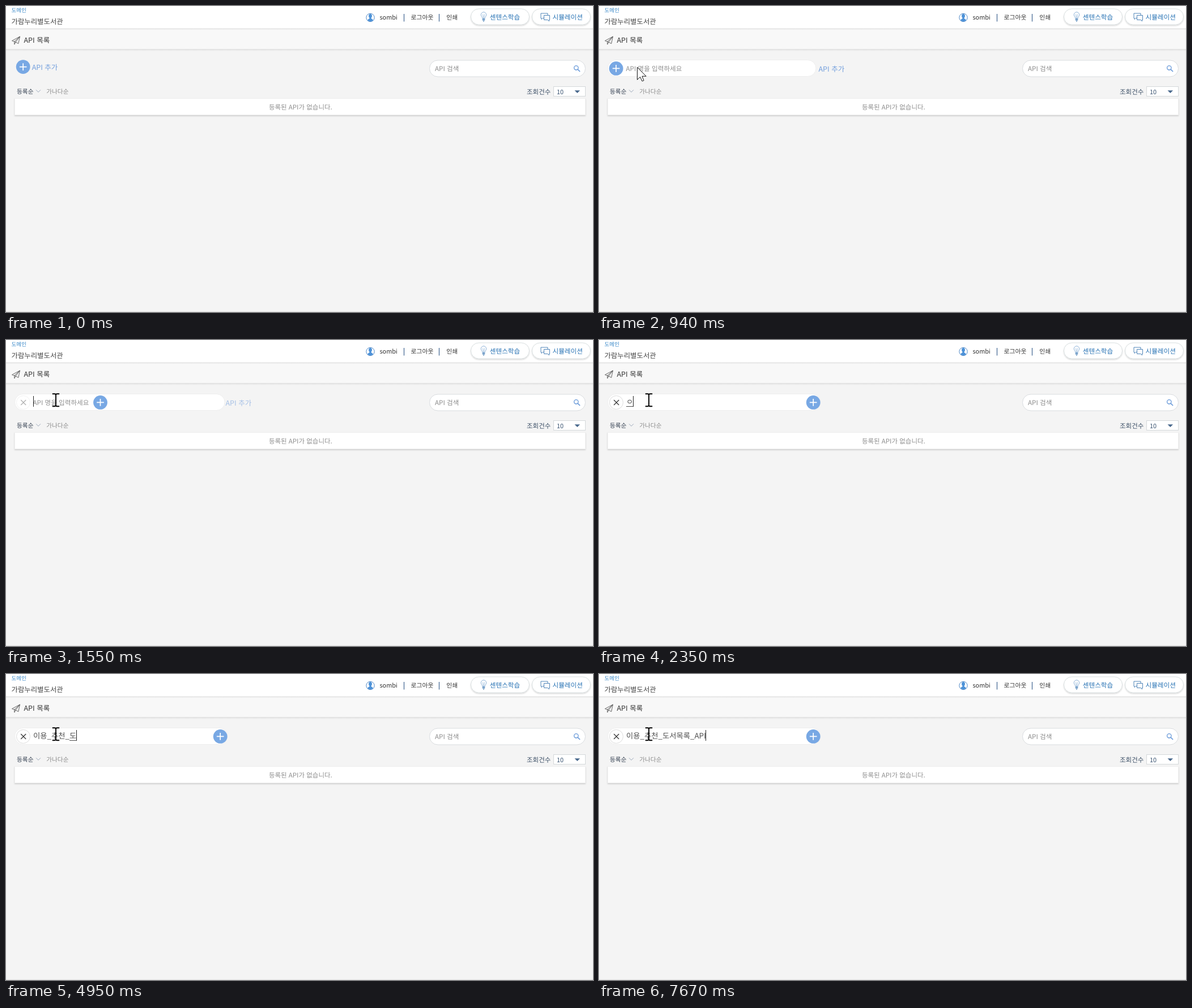
These frames come from a looping animation (1036 px wide and 541 px high, 8 s). An HTML page:

```html
<!DOCTYPE html>
<html lang="ko">
<head>
<meta charset="utf-8">
<title>API 목록</title>
<style>
html, body { margin: 0; width: 100%; height: 100%; overflow: hidden; background: #f4f4f4; }
svg { display: block; width: 1036px; height: 541px; }
text {
  font-family: "Noto Sans CJK KR", "Noto Sans KR", "Noto Sans CJK", sans-serif;
  text-rendering: geometricPrecision;
  white-space: pre;
}
</style>
</head>
<body>
<svg viewBox="0 0 1036 541" xmlns="http://www.w3.org/2000/svg">
  <defs>
    <filter id="shade" x="-10%" y="-30%" width="120%" height="180%">
      <feDropShadow dx="0" dy="1.5" stdDeviation="1.3" flood-color="#000" flood-opacity=".17"/>
    </filter>
    <linearGradient id="fade" x2="0" y2="1">
      <stop offset="0" stop-color="#dedede"/>
      <stop offset="1" stop-color="#f4f4f4"/>
    </linearGradient>
    <clipPath id="inPill"><rect id="clip" x="15" y="95" height="30"/></clipPath>
  </defs>

  <rect width="1036" height="541" fill="#f4f4f4"/>
  <rect y="40" width="1036" height="37" fill="#f8f8f8"/>
  <rect y="76" width="1036" height="4" fill="url(#fade)"/>
  <rect width="1036" height="40" fill="#fff"/>
  <rect y="39.5" width="1036" height="2.5" fill="url(#fade)"/>
  <rect y="540" width="1036" height="1" fill="#e2e2e2"/>

  <!-- top bar -->
  <text x="9.5" y="11.3" font-size="9.6" fill="#3c8ac9">도메인</text>
  <text x="9.5" y="31.6" font-size="12.4" fill="#444">가람누리별도서관</text>
  <g fill="none" stroke="#4d86c6">
    <circle cx="643" cy="20.5" r="7.2" fill="#fff"/>
    <path d="M638 25.6q.5-2.8 3.4-3.4v-1.3q-1.8-2-1.3-4.6.7-2.3 2.9-2.3t2.9 2.3q.5 2.6-1.3 4.6v1.3q2.9.6 3.4 3.4-5 3.2-10 0z" fill="#4d92d8" stroke="none"/>
  </g>
  <g font-size="10.83" fill="#333">
    <text x="659.5" y="24.3">sombi</text>
    <text x="714.5" y="24.3">로그아웃</text>
    <text x="777.3" y="24.3">인쇄</text>
  </g>
  <path d="M702.5 14v13.5M764.5 14v13.5" stroke="#3f6490" stroke-width="1.2"/>
  <g fill="#fff" stroke="#d9dfe0" filter="url(#shade)">
    <rect x="820.5" y="5" width="103" height="28" rx="14"/>
    <rect x="928.5" y="5" width="103" height="28" rx="14"/>
  </g>
  <g font-size="11.6" fill="#2470b3">
    <text x="853.8" y="24.3">센텐스학습</text>
    <text x="964.5" y="24.3">시뮬레이션</text>
  </g>
  <g fill="none" stroke="#3b76b0" stroke-width=".9">
    <path d="M841 22.5q-.2-2.5-1.8-4.2-1.7-2.4-.4-5 1.4-2.5 4.2-2.6 2.8.1 4.2 2.6 1.3 2.6-.4 5-1.6 1.7-1.8 4.2z" stroke="#7fa9d3"/>
    <path d="M841.5 14.5l1 7.5M844.5 14.5l-1 7.5" stroke="#7fa9d3" stroke-width=".7"/>
    <path d="M840.6 23.5h4.8M840.8 25.2h4.4M842 27h2" stroke-width="1.1"/>
    <path d="M949.5 21.5h-2l-2.5 2v-2h-1v-8.5h12v3"/>
    <path d="M949.5 16.5h10v8h-1v2.3l-2.5-2.3h-6.5z" fill="#fff"/>
  </g>

  <!-- page title -->
  <g fill="none" stroke="#555" stroke-width=".9" stroke-linejoin="round">
    <path d="M10.5 61.5L24.5 54 21.8 66.5 17 63.8z"/>
    <path d="M24.5 54L14.8 63v5l2.2-4.2z"/>
  </g>
  <text x="31.5" y="65" font-size="12.5" fill="#333">API 목록</text>

  <!-- search, sorting, list -->
  <rect x="747.5" y="96" width="275" height="29" rx="14.5" fill="#fff" stroke="#d9dcdf"/>
  <text x="757" y="115.2" font-size="11.6" fill="#8b8b8b">API 검색</text>
  <g fill="none" stroke="#6698d8" stroke-width="1.3">
    <circle cx="1006.3" cy="109.3" r="3.7"/>
    <path d="M1009 112l4 4" stroke-width="1.7"/>
  </g>
  <text x="19" y="154.8" font-size="10.7" fill="#333f50">등록순</text>
  <path d="M53 148.3l4 4 4-4" fill="none" stroke="#9aa8ba"/>
  <text x="71.2" y="154.8" font-size="10.7" fill="#8c8c8c">가나다순</text>
  <text x="919" y="155.8" font-size="11.5" fill="#3c4f66">조회건수</text>
  <rect x="966.5" y="142.5" width="56" height="17" fill="#fff" stroke="#d4d8da"/>
  <text x="972" y="155.6" font-size="10.83" fill="#334e6c">10</text>
  <path d="M1003.5 149.3h9.6l-4.8 4.6z" fill="#48688c"/>
  <rect x="15.5" y="163.5" width="1007" height="29" fill="#fff" stroke="#efefef" filter="url(#shade)"/>
  <text x="463.9" y="183.2" font-size="11.5" fill="#8f8f8f">등록된 API가 없습니다.</text>

  <!-- add field -->
  <rect id="pill" x="15.5" y="95.5" height="29" rx="14.5" fill="#fff" stroke="#eee"/>
  <text id="hint" x="47.5" y="114.6" font-size="11.6" fill="#8f8f8f" clip-path="url(#inPill)">API 명을 입력하세요</text>
  <text id="typed" x="48" y="114" font-size="13.333" fill="#505050"></text>
  <rect id="under" y="117" height="1" fill="#505050"/>
  <rect id="caret" y="99" width="1" height="19" fill="#222"/>
  <text id="label" font-size="12.5" fill="#739fdd">API 추가</text>
  <g id="close">
    <circle cx="30.5" cy="110.5" r="12" fill="#fff" stroke="#dcdcdc"/>
    <path d="M26.2 106l9 9M35.2 106l-9 9" stroke="#333" stroke-width="1.2"/>
  </g>
  <g id="plus">
    <circle r="12.4" fill="#78a8e4"/>
    <path d="M-6.3 0H6.3M0-6.3V6.3" stroke="#fff" stroke-width="1.7"/>
  </g>

  <path id="arrow" d="M0 0V22.1L5.2 17.2 8.6 24.7 11.6 23.5 8.5 16H15.7z" fill="#fff" stroke="#111"/>
  <path id="beam" d="M-6.2-11h4.2q2 0 2 2 0-2 2-2h4.2M0-9.5v19M-6.2 11h4.2q2 0 2-2 0 2 2 2h4.2" fill="none" stroke="#000" stroke-width="1.9"/>
</svg>
<script>
const LOOP = 8000, BLINK = 520, FOCUS = 1430;
const el = {};
document.querySelectorAll('[id]').forEach(n => el[n.id] = n);

// time, committed text, text still being composed
const keys = [
  [FOCUS, '', ''],
  [2350, '', 'ㅇ'], [2510, '', '이'], [2690, '', '잉'],
  [2840, '', '이요'], [2970, '', '이용'], [3550, '이용_', ''],
  [3820, '이용_', 'ㅊ'], [3890, '이용_', '추'], [4040, '이용_', '춫'],
  [4140, '이용_', '추처'], [4230, '이용_', '추천'], [4620, '이용_추천_', ''],
  ...[[4900, 'ㄷ'], [4950, '도'], [5090, '돗'], [5300, '도서'], [5500, '도섬'],
    [5610, '도서모'], [5720, '도서목'], [5830, '도서목ㄹ'], [5940, '도서목로'],
    [6090, '도서목록']].map(([t, s]) => [t, '이용_추천_', s]),
  ...[[6670, ''], [7270, 'A'], [7470, 'AP'], [7670, 'API']]
    .map(([t, s]) => [t, '이용_추천_도서목록_' + s, ''])
];

const clamp = v => Math.max(0, Math.min(1, v));
const mix = (a, b, p) => a + (b - a) * p;
const ease = p => p * p * (3 - 2 * p);
const span = (t, a, b) => ease(clamp((t - a) / (b - a)));
const show = (n, on) => n.setAttribute('visibility', on ? 'visible' : 'hidden');
const move = (n, x, y) => n.setAttribute('transform', `translate(${x} ${y})`);
const set = (n, o) => { for (const k in o) n.setAttribute(k, o[k]); };

function drawField(t) {
  const open = span(t, 590, 920);
  const slide = span(t, FOCUS - 20, 1740);
  const right = mix(mix(42, 383, open), 391, slide);
  set(el.pill, { width: right - 15.5, opacity: clamp(open * 4) });
  set(el.clip, { width: Math.max(0, right - 20) });
  set(el.label, {
    x: mix(45.7, 387.5, open), y: mix(113, 115.6, open), opacity: 1 - slide
  });
  move(el.plus, mix(30.2, 378.2, slide), mix(107.6, 110.4, open));
  el.close.setAttribute('opacity', slide);
  show(el.hint, open > 0 && t < keys[1][0]);
}

function drawText(t) {
  const key = keys.filter(k => k[0] <= t).pop();
  const [at, done, part] = key || [0, '', ''];
  const measure = s => {
    el.typed.textContent = s;
    return s ? el.typed.getComputedTextLength() : 0;
  };
  const start = measure(done), end = measure(done + part);
  set(el.under, { x: 48 + start, width: end - start });
  show(el.under, part);
  el.caret.setAttribute('x', Math.floor(48 + end));
  show(el.caret, key && Math.floor((t - at) / BLINK) % 2 === 0);
}

function drawPointer(t) {
  const step = Math.floor((t - 190) / 70) * 70;
  const p = ease(clamp(step / 350));
  move(el.arrow, mix(460, 67.5, p), mix(459, 108.2, p));
  show(el.arrow, t >= 190 && t < 1070);
  const a = span(t, 1070, 1320), b = span(t, 1400, 1480);
  move(el.beam, mix(mix(69, 85, a), 88, b), mix(mix(108, 105.3, a), 106.2, b));
  show(el.beam, t >= 1070);
}

function draw(t) {
  drawField(t);
  drawText(t);
  drawPointer(t);
}

const begin = performance.now();
function tick() {
  draw((performance.now() - begin) % LOOP);
  requestAnimationFrame(tick);
}
draw(0);
requestAnimationFrame(tick);
</script>
</body>
</html>
```
